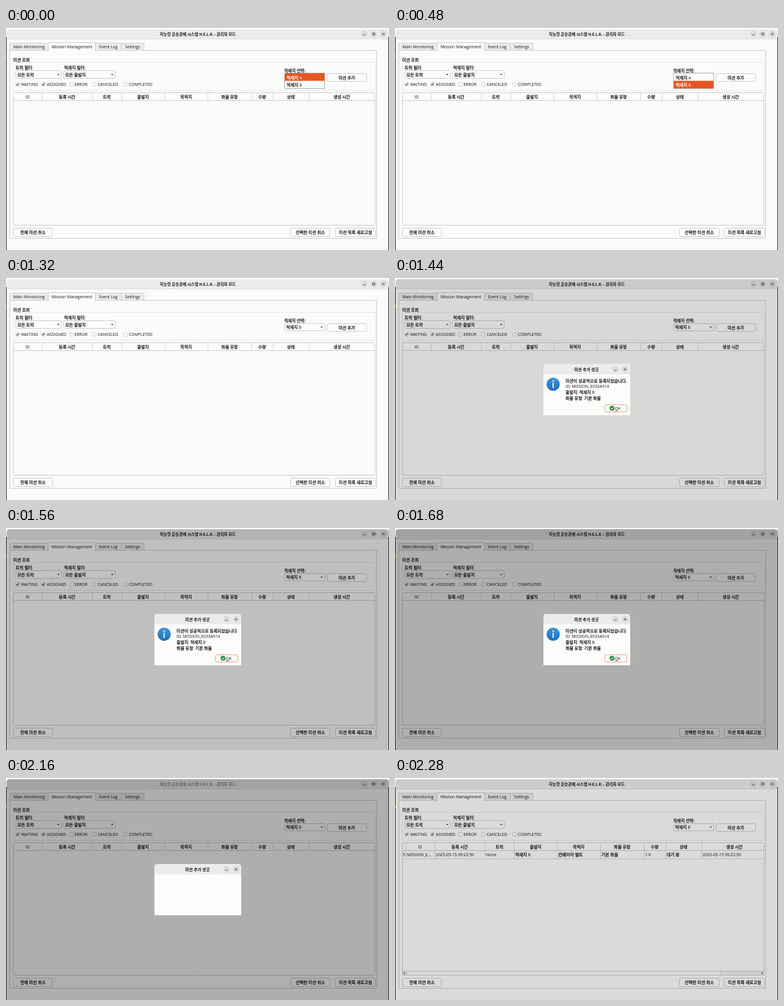
These frames come from a looping animation (640 px wide and 372 px high, 2.4 s). An HTML page with a canvas:

```html
<!DOCTYPE html>
<html lang="ko">
<head>
<meta charset="utf-8">
<title>미션 관리</title>
<style>
html, body { margin: 0; width: 100%; height: 100%; overflow: hidden; background: #fff; }
canvas { display: block; width: 640px; height: 372px; }
</style>
</head>
<body>
<canvas id="stage" width="640" height="372"></canvas>
<script>
const ctx = document.getElementById('stage').getContext('2d');
const LOOP = 2400, STEP = 120;
const INK = '#161616', BODY = '#fbfbf9', EDGE = '#cacac8', BAR = '#ebebea';
const LATIN = '"Open Sans", "Noto Sans", sans-serif';
const HANGUL = '"Noto Sans CJK KR", "Noto Sans CJK", sans-serif';

// Hangul and Latin runs get their own font; cy is the optical middle of the line.
function text(str, x, cy, { align = 'left', color = INK, bold = false, scale = 1 } = {}) {
  const weight = bold ? '700 ' : '400 ';
  const runs = str.match(/[가-힣]+|[^가-힣]+/g).map(s => {
    const hangul = /[가-힣]/.test(s);
    const font = hangul
      ? weight + 7.05 * scale + 'px ' + HANGUL
      : weight + 6.8 * scale + 'px ' + LATIN;
    ctx.font = font;
    return { s, hangul, font, w: ctx.measureText(s).width };
  });
  if (align === 'center') x -= runs.reduce((sum, r) => sum + r.w, 0) / 2;
  ctx.fillStyle = ctx.strokeStyle = color;
  ctx.lineWidth = .25;
  for (const r of runs) {
    ctx.font = r.font;
    ctx.fillText(r.s, x, cy + 2.5);
    // a hairline gives the regular Hangul a medium weight
    if (r.hangul && !bold) ctx.strokeText(r.s, x, cy + 2.5);
    x += r.w;
  }
}

function rect(x, y, w, h, color) {
  ctx.fillStyle = color;
  ctx.fillRect(x, y, w, h);
}

function box(x0, y0, x1, y1, fill, edge, r = 0) {
  ctx.beginPath();
  ctx.roundRect(x0 + .5, y0 + .5, x1 - x0 - 1, y1 - y0 - 1, r);
  ctx.fillStyle = fill;
  ctx.fill();
  ctx.strokeStyle = edge;
  ctx.lineWidth = 1;
  ctx.stroke();
}

function panel(x, y, w, h, fill) {
  ctx.beginPath();
  ctx.roundRect(x, y, w, h, [5, 5, 0, 0]);
  ctx.fillStyle = fill;
  ctx.fill();
}

function disc(x, y, r, fill) {
  ctx.beginPath();
  ctx.arc(x, y, r, 0, 7);
  ctx.fillStyle = fill;
  ctx.fill();
}

function path(points, color, width = 1) {
  ctx.beginPath();
  points.forEach(([x, y], i) => i ? ctx.lineTo(x, y) : ctx.moveTo(x, y));
  ctx.strokeStyle = color;
  ctx.lineWidth = width;
  ctx.stroke();
}

function triangle(a, b, c, color = '#444') {
  ctx.beginPath();
  ctx.moveTo(...a);
  ctx.lineTo(...b);
  ctx.lineTo(...c);
  ctx.fillStyle = color;
  ctx.fill();
}

function button(label, x0, y0, x1, y1) {
  box(x0, y0, x1, y1, '#fdfdfc', EDGE, 2);
  text(label, (x0 + x1) / 2, (y0 + y1) / 2, { align: 'center' });
}

function combo(label, x0, y0, x1, y1) {
  box(x0, y0, x1, y1, '#fdfdfc', EDGE, 2);
  const cy = (y0 + y1) / 2, ax = x1 - 5.5;
  text(label, x0 + 3, cy + .3);
  triangle([ax - 2, cy - 1], [ax + 2, cy - 1], [ax, cy + 1.2]);
}

function check(label, x, on, tx) {
  box(x, 91, x + 7, 98, '#fff', '#cbcbc9', 1);
  if (on) path([[x + 1.7, 94.3], [x + 3, 95.8], [x + 5.3, 92.6]], '#222', 1.1);
  text(label, tx, 94.4);
}

function minimize(x, y) {
  disc(x, y, 5.5, '#dadad9');
  path([[x - 2, y + 1.5], [x + 2, y + 1.5]], '#444', .8);
}

function close(x, y) {
  disc(x, y, 5.5, '#dadad9');
  path([[x - 1.8, y - 1.8], [x + 1.8, y + 1.8]], '#333', .9);
  path([[x + 1.8, y - 1.8], [x - 1.8, y + 1.8]], '#333', .9);
}

function frame(titleColor) {
  rect(0, 0, 640, 372, '#fff');
  panel(1, 2, 639, 370, BODY);
  panel(1, 2, 639, 17, BAR);
  rect(1, 18, 639, 1, '#dededc');
  text('지능형 운송관제 시스템 H.E.L.K. - 관리자 모드', 320.5, 10,
    { align: 'center', bold: true, scale: .94, color: titleColor });
  minimize(599, 10);
  disc(614.5, 10, 5.5, '#dadad9');
  ctx.strokeStyle = '#333';
  ctx.lineWidth = .8;
  ctx.strokeRect(612.8, 8.3, 3.4, 3.4);
  close(630.5, 10);
}

function tabs() {
  box(6, 37, 620, 353, BODY, EDGE);
  const tab = (label, x0, x1) => {
    box(x0, 25, x1, 38, '#ececea', EDGE);
    text(label, (x0 + x1) / 2, 31.2, { align: 'center' });
  };
  tab('Main Monitoring', 6, 71);
  tab('Event Log', 149, 193);
  tab('Settings', 192, 231);
  box(70, 24, 150, 39, BODY, EDGE);
  rect(71, 37, 78, 3, BODY);
  text('Mission Management', 110, 31, { align: 'center' });
}

function filters(t) {
  box(12, 57, 618, 105, BODY, '#e8e8e6');
  text('미션 조회', 12, 53);
  text('트럭 필터:', 16, 66.7);
  text('적재지 필터:', 97, 66.7);
  combo('모든 트럭', 16, 71, 93, 85);
  combo('모든 출발지', 96, 71, 183, 85);
  check('WAITING', 16, true, 25.3);
  check('ASSIGNED', 59, true, 68.3);
  check('ERROR', 106, false, 114.5);
  check('CANCELED', 144, false, 153.3);
  check('COMPLETED', 196, false, 205.3);
  text('적재지 선택:', 465, 71, { bold: true, scale: .98 });
  button('미션 추가', 536, 76, 603, 90);
  if (t < 720) dropdown(t < 360 ? 0 : 1);
  else combo('적재지 B', 465, 76, 533, 89);
}

function dropdown(active) {
  box(465, 75, 533, 102, '#fdfdfc', '#aaa9a6');
  ['적재지 A', '적재지 B'].forEach((label, i) => {
    const on = i === active;
    if (on) rect(466, 76 + i * 12.5, 66, 12.5, '#e95420');
    text(label, 469, 83 + i * 12, { color: on ? '#fff' : INK });
  });
}

const HEADS = ['ID', '등록 시간', '트럭', '출발지', '목적지', '화물 유형', '수량', '상태', '생성 시간'];
const EDGES = [12, 60, 144, 193, 265, 337, 410, 446, 506, 616];
const ROW = ['MISSION_E...', '2025-05-15 09:22:50', 'None', '적재지 B', '컨베이어 벨트',
  '기본 화물', '1.0', '대기 중', '2025-05-15 09:22:50'];

function table(filled) {
  const shift = filled ? 6 : 0, line = '#d6d6d4';
  box(12, 108, 617, 331, BODY, EDGE, 1);
  rect(13, 109, 603, 12, '#fcfcfb');
  rect(12, 121, 605, 1, EDGE);
  HEADS.forEach((label, i) => {
    const x = EDGES[i] + shift, end = EDGES[i + 1] + shift;
    if (i || filled) rect(x, 109, 1, 12, line);
    text(label, (x + end) / 2, 115.5, { align: 'center' });
    if (!filled) return;
    text(ROW[i], x + 2, 128);
    rect(x, 122, 1, 13, line);
  });
  if (!filled) return;
  text('5', 13, 128);
  rect(13, 135, 603, 1, line);
  box(12, 323, 617, 331, '#efefed', EDGE);
  box(19, 323, 545, 331, '#fbfbfa', EDGE);
  triangle([14, 327], [16.5, 325.2], [16.5, 328.8]);
  triangle([615, 327], [612.5, 325.2], [612.5, 328.8]);
}

function dialog(full) {
  panel(248, 144, 145, 86, '#fcfcfb');
  panel(248, 144, 145, 17.5, BAR);
  text('미션 추가 성공', 320, 153, { align: 'center', bold: true, scale: .97 });
  minimize(368.5, 153);
  close(384.5, 153);
  if (!full) return;

  const blue = ctx.createLinearGradient(0, 167, 0, 189);
  blue.addColorStop(0, '#3b98dc');
  blue.addColorStop(1, '#1e6fb9');
  disc(264.3, 178, 11, blue);
  disc(264.3, 172.7, 1.3, '#fff');
  rect(263.3, 175.6, 2, 8.6, '#fff');

  ['미션이 성공적으로 등록되었습니다.', 'ID: MISSION_E033A914', '출발지: 적재지 B', '화물 유형: 기본 화물']
    .forEach((line, i) => text(line, 285, 172.3 + i * 9.6));

  box(350, 212, 388, 225, '#fdfdfc', '#e8a283', 2);
  disc(362.7, 218.2, 4, '#17862b');
  path([[360.7, 218.3], [362.2, 219.9], [364.8, 216.7]], '#fff', 1.1);
  text('OK', 367.5, 218.3);
  rect(367.7, 222, 5, .8, INK);
}

// Backdrop shade: eases in behind the dialog, lifts at the end.
function shade(t) {
  if (t < 1440) return 0;
  if (t >= 2280) return .135;
  return [.14, .24][(t - 1440) / STEP] ?? .31;
}

function draw(t) {
  const open = t >= 1440 && t < 2280, closing = t === 2160;
  frame(closing ? '#8a8a8a' : INK);
  tabs();
  filters(t);
  table(t >= 2280);
  button('전체 미션 취소', 12, 335, 78, 350);
  button('선택한 미션 취소', 475, 335, 542, 350);
  button('미션 목록 새로고침', 550, 335, 618, 350);
  panel(1, 2, 639, 370, `rgba(0,0,0,${shade(t)})`);
  rect(0, 15, 1, 357, '#3a1530');
  rect(0, 45, 1, 6, '#3f66b0');
  rect(639, 15, 1, 357, '#3a1530');
  if (open) dialog(!closing);
}

const start = performance.now();
function tick() {
  const t = (performance.now() - start) % LOOP;
  draw(Math.floor(t / STEP) * STEP);
  requestAnimationFrame(tick);
}
tick();
</script>
</body>
</html>
```
